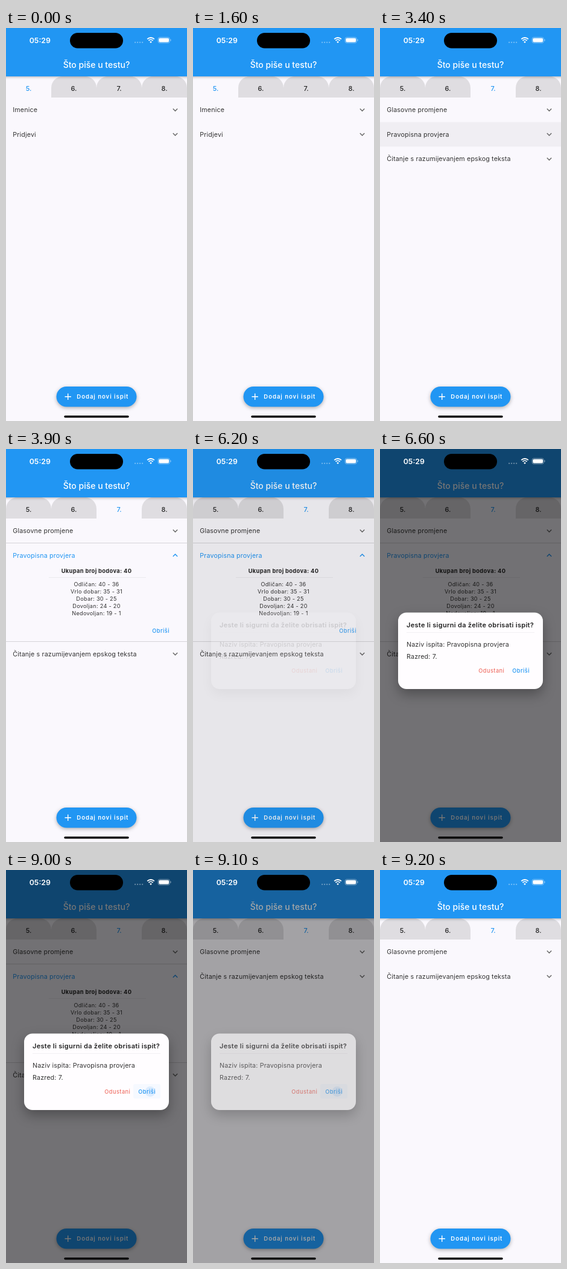
These frames come from a looping animation (300 by 650 pixels, 9.3 s). An HTML page:

```html
<!DOCTYPE html>
<html lang="hr">
<head>
<meta charset="utf-8">
<style>
html, body { margin: 0; width: 100%; height: 100%; overflow: hidden; background: #faf8fd; }
svg { display: block; width: 300px; height: 650px; font: 400 10.7px Inter, Roboto, sans-serif; }
.row { letter-spacing: .15px; }
.small { font-size: 9.15px; letter-spacing: .3px; }
.total { font-size: 9.3px; font-weight: 700; letter-spacing: .35px; }
.button { font-size: 9.2px; font-weight: 500; letter-spacing: .45px; }
.fab { font-size: 9.6px; font-weight: 600; letter-spacing: .95px; }
.heading { font-size: 11px; font-weight: 600; letter-spacing: .3px; }
.title { font-size: 14px; font-weight: 500; }
.clock { font-size: 12.3px; font-weight: 600; }
.tab { font-size: 10.9px; font-weight: 500; }
.bar { filter: drop-shadow(0 1.5px 2px rgba(0, 0, 0, .3)); }
.lift { filter: drop-shadow(0 2.5px 3px rgba(0, 0, 0, .3)); }
.float { filter: drop-shadow(0 9px 10px rgba(0, 0, 0, .3)); }
</style>
</head>
<body>
<svg id="stage" viewBox="0 0 300 650"></svg>
<script>
const LOOP = 9300, STEP = 100;
const BLUE = '#2196f3', INK = '#333', ROW = 40.6, BODY = 122.4, TOP = 115;
const stage = document.getElementById('stage');

const bezier = (x1, y1, x2, y2) => x => {
  const at = (a, b, u) => 3 * a * u * (1 - u) ** 2 + 3 * b * u * u * (1 - u) + u ** 3;
  let lo = 0, hi = 1;
  for (let i = 0; i < 20; i++) {
    const mid = (lo + hi) / 2;
    if (at(x1, x2, mid) < x) lo = mid; else hi = mid;
  }
  return at(y1, y2, (lo + hi) / 2);
};
const ease = bezier(.25, .1, .25, 1);
const easeIn = bezier(.42, 0, 1, 1);
const easeOut = bezier(0, 0, .58, 1);
const span = (t, start, length) => Math.min(1, Math.max(0, (t - start) / length));

// y is the vertical middle of the lettering
const text = (cls, x, y, words, fill = INK, anchor = 'start') =>
  `<text class="${cls}" x="${x}" y="${y}" dy=".36em" text-anchor="${anchor}" style="fill:${fill}">${words}</text>`;
const rect = (x, y, w, h, fill, rx = 0, more = '') =>
  `<rect x="${x}" y="${y}" width="${w}" height="${h}" fill="${fill}" rx="${rx}" ${more}/>`;

function row(name, top, open = 0) {
  const mix = other => `color-mix(in srgb, ${BLUE} ${open * 100}%, ${other})`;
  const y = top + ROW / 2;
  return text('row', 11.3, y, name, mix(INK)) +
    `<path d="M-3.7-1.8L0 1.9L3.7-1.8" transform="translate(280.5 ${y}) rotate(${180 * open})"
      style="fill:none;stroke:${mix('#666')};stroke-width:1.4"/>`;
}

function details(top, open) {
  const grades = ['Odličan: 40 - 36', 'Vrlo dobar: 35 - 31', 'Dobar: 30 - 25', 'Dovoljan: 24 - 20', 'Nedovoljan: 19 - 1'];
  return `<clipPath id="fold">${rect(0, top, 300, BODY * open)}</clipPath>
    <g clip-path="url(#fold)"><g transform="translate(0 ${top - BODY * (1 - open) / 2})">` +
    text('total', 150, 5, 'Ukupan broj bodova: 40', '#222', 'middle') +
    rect(71, 16, 161, .7, '#e6e4e9') +
    grades.map((g, i) => text('small', 150, 28 + 11.9 * i, g, INK, 'middle')).join('') +
    text('button', 242.3, 105, 'Obriši', BLUE) + '</g></g>';
}

function lessons(t) {
  const open = easeIn(span(t, 3450, 200));
  const second = TOP + ROW, body = second + ROW, last = 'Čitanje s razumijevanjem epskog teksta';
  let out = row('Glasovne promjene', TOP);
  if (t > 9000) return out + row(last, second);
  if (t >= 3400 && t < 3900)
    out += rect(0, second, 300, ROW, '#000', 0, `opacity="${.04 * (1 - span(t, 3600, 300))}"`);
  out += row('Pravopisna provjera', second, open) + row(last, body + BODY * open);
  if (open) out += details(body, open) +
    [second, body + BODY * open].map(y => rect(0, y - .4, 300, .8, '#ceccd1', 0, `opacity="${open}"`)).join('');
  return out;
}

function tabs(selected) {
  return [5, 6, 7, 8].map((n, i) => {
    const x = 75 * i, on = n === selected;
    return (on ? '' : `<path d="M${x} 115V99a19 19 0 0 1 19-19h37a19 19 0 0 1 19 19v16z" fill="#dfdde1"/>`) +
      text('tab', x + 37.5, 100, n + '.', on ? BLUE : '#222', 'middle');
  }).join('');
}

function addButton() {
  return rect(83.5, 593, 133, 33.5, BLUE, 16.75, 'class="lift"') +
    '<path d="M97.5 609.8h10.4M102.7 604.6v10.4" stroke="#fff" stroke-width="1.4"/>' +
    text('fab', 117.3, 609.7, 'Dodaj novi ispit', '#fff');
}

function dialog(t) {
  const shown = t < 9000 ? easeOut(span(t, 6187, 150)) : easeOut(1 - span(t, 9020, 150));
  if (!shown) return '';
  const press = t < 9000 ? '' :
    rect(211, 354, 45, 24, BLUE, 3, 'opacity=".04"') + `<circle cx="239" cy="366.5" r="8.5" fill="${BLUE}" opacity=".12"/>`;
  return rect(0, 0, 300, 650, '#000', 0, `opacity="${.54 * shown}"`) + `<g opacity="${shown}">` +
    rect(30, 270.5, 240, 126.5, '#fffdff', 14, 'class="float"') +
    text('heading', 44, 291.3, 'Jeste li sigurni da želite obrisati ispit?', '#222') +
    rect(44, 303, 212, .7, '#eceaee') +
    text('row', 44, 322.7, 'Naziv ispita: Pravopisna provjera') +
    text('row', 44, 343, 'Razred: 7.') + press +
    text('button', 163.3, 366.3, 'Odustani', '#f0736a') +
    text('button', 219.3, 366.3, 'Obriši', BLUE) + '</g>';
}

function statusBar() {
  const dots = [0, 1, 2, 3].map(i => rect(213 + 4 * i, 22.7, 2.2, 2, '#fff', .8, 'opacity=".4"')).join('');
  return text('clock', 56.3, 20.3, '05:29', '#fff', 'middle') +
    rect(106, 8, 88, 25.5, '#000', 12.75) + dots +
    `<g fill="none" stroke="#fff" stroke-width="1.8">
      <path d="M234.2 18.3a8.4 8.4 0 0 1 11.6 0M236.4 20.9a5.2 5.2 0 0 1 7.2 0"/></g>
    <path d="M240 25l-1.9-2.1a2.8 2.8 0 0 1 3.8 0z" fill="#fff"/>` +
    rect(252, 15.4, 19.4, 9.4, 'none', 3, 'stroke="#fff" stroke-width=".8" opacity=".5"') +
    rect(253.3, 16.7, 16.8, 6.8, '#fff', 1.9) + rect(272.4, 18.6, 1.1, 3, '#fff', .5, 'opacity=".5"');
}

function scene(t) {
  const slide = ease(span(t, 1650, 300));
  return rect(0, 0, 300, 650, '#faf8fd') +
    (slide < 1 ? `<g transform="translate(${-300 * slide})">${row('Imenice', TOP)}${row('Pridjevi', TOP + ROW)}</g>` : '') +
    (slide > 0 ? `<g transform="translate(${300 * (1 - slide)})">${lessons(t)}</g>` : '') +
    tabs(t > 1600 ? 7 : 5) + rect(-5, -5, 310, 85, BLUE, 0, 'class="bar"') +
    text('title', 150, 60.7, 'Što piše u testu?', '#fff', 'middle') +
    addButton() + rect(96.3, 641, 107.4, 3.4, '#000', 1.7) + dialog(t) + statusBar();
}

let drawn = -1;
function tick() {
  const t = Math.floor(performance.now() % LOOP / STEP) * STEP;
  if (t !== drawn) stage.innerHTML = scene(drawn = t);
  requestAnimationFrame(tick);
}
tick();
</script>
</body>
</html>
```
